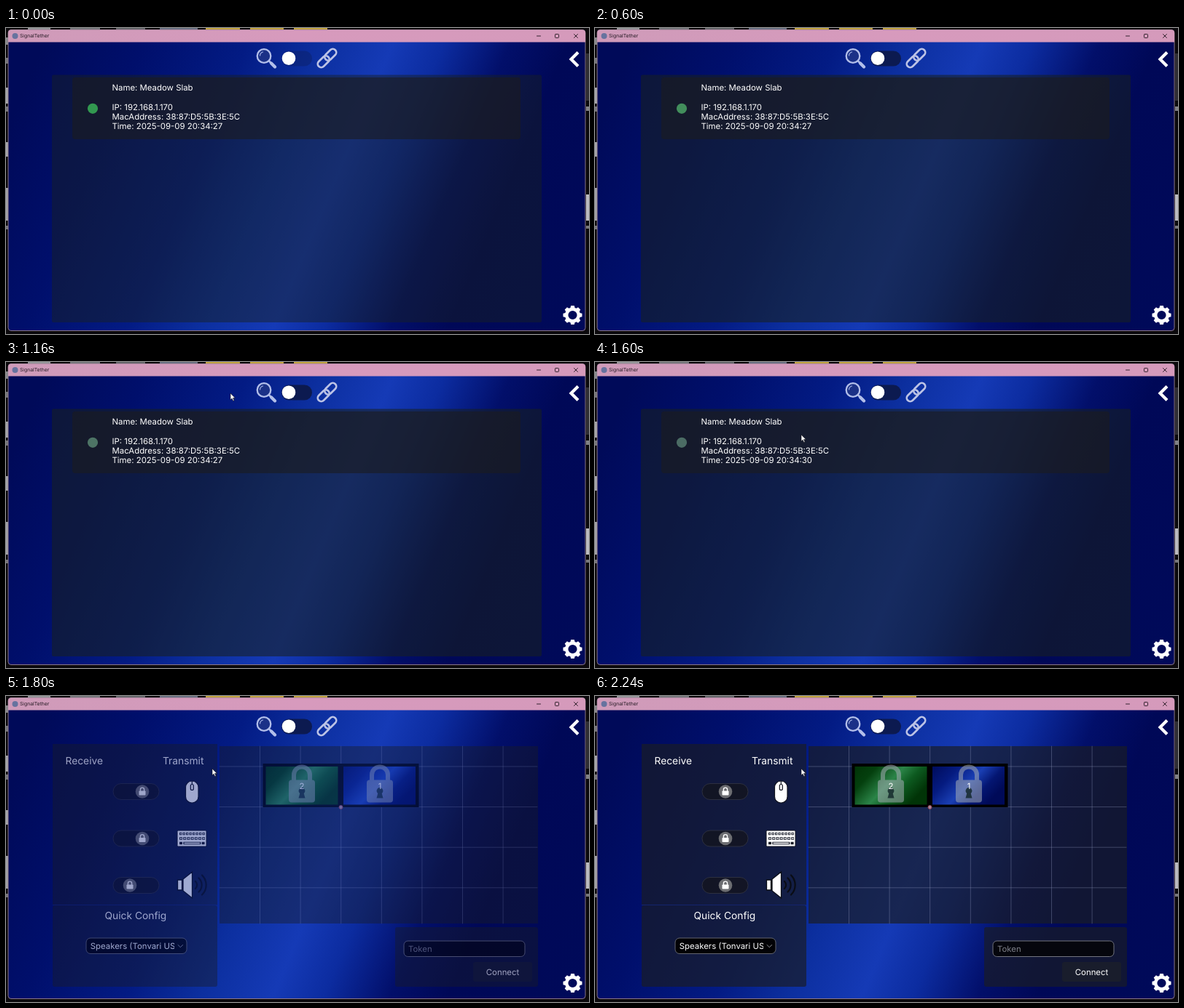
Recreate the animation shown at these times as an HTML page. Size 800 by 421 pixels, loop 2280 ms.

```html
<!DOCTYPE html>
<html lang="en">
<head>
<meta charset="utf-8">
<title>SignalTether</title>
<style>
  html, body { margin: 0; width: 100%; height: 100%; overflow: hidden; background: #0b090c; }
  svg { display: block; width: 100vw; height: 100vh; }
  text { font-family: Inter, "Open Sans", sans-serif; fill: #fff; text-rendering: geometricPrecision; white-space: pre; }
  .body { font-size: 11.4px; }
  .head { font-size: 13.8px; }
  .line { fill: none; stroke-linecap: round; stroke-linejoin: round; }
</style>
</head>
<body>
<svg viewBox="0 0 800 421" preserveAspectRatio="none">
  <defs>
    <linearGradient id="beam" gradientUnits="userSpaceOnUse" x1="0" y1="0" x2="850" y2="357">
      <stop offset=".06" stop-color="#000a59"/>
      <stop offset=".2" stop-color="#000f6c"/>
      <stop offset=".34" stop-color="#031b84"/>
      <stop offset=".44" stop-color="#0c2f9f"/>
      <stop offset=".54" stop-color="#153ab6"/>
      <stop offset=".61" stop-color="#0c2ca0"/>
      <stop offset=".7" stop-color="#020f6a"/>
      <stop offset=".78" stop-color="#000857"/>
      <stop offset="1" stop-color="#000a5a"/>
    </linearGradient>
    <linearGradient id="bar" x1="0" x2="1" y1="0" y2="0">
      <stop offset="0" stop-color="#cf9bb9"/>
      <stop offset=".5" stop-color="#d79abd"/>
      <stop offset="1" stop-color="#d59abb"/>
    </linearGradient>
    <linearGradient id="green" x1="0" x2="1" y1="0" y2=".5">
      <stop offset="0" stop-color="#013307"/>
      <stop offset=".25" stop-color="#04400e"/>
      <stop offset=".55" stop-color="#2b8448"/>
      <stop offset=".75" stop-color="#0d5a20"/>
      <stop offset="1" stop-color="#013407"/>
    </linearGradient>
    <linearGradient id="blue" x1="0" x2="1" y1="0" y2=".5">
      <stop offset="0" stop-color="#000c5c"/>
      <stop offset=".3" stop-color="#051b80"/>
      <stop offset=".58" stop-color="#1a3fb4"/>
      <stop offset=".8" stop-color="#041672"/>
      <stop offset="1" stop-color="#000a58"/>
    </linearGradient>
    <clipPath id="comboClip"><rect x="112" y="334" width="119" height="20"/></clipPath>
    <g id="padlock">
      <path class="line" d="M-11 -7V-16a11 11 0 0 1 22 0V-7" stroke="#a4acb4" stroke-width="6" stroke-linecap="butt"/>
      <rect x="-18" y="-9" width="36" height="31" rx="4" fill="#a4acb4"/>
    </g>
    <g id="keyhole">
      <circle cy="6" r="4.4" fill="#102528"/>
      <path d="M-2 7h4l2.5 9h-9z" fill="#102528"/>
    </g>
    <g id="knob">
      <circle r="9.3" fill="#6c6d71"/>
      <path class="line" d="M-2.6 -1v-1.8a2.6 2.6 0 0 1 5.2 0V-1" stroke="#fff" stroke-width="1.4"/>
      <rect x="-4.5" y="-1" width="9" height="6" rx=".8" fill="#fff"/>
    </g>
  </defs>

  <!-- desktop edges behind the window -->
  <g id="desktop"></g>

  <!-- window -->
  <rect x="3" y="2.5" width="792" height="414" rx="4" fill="url(#beam)" stroke="#8b7686" stroke-width="1"/>
  <path d="M3 19.5V6.500q0-4 4-4H791q4 0 4 4V19.500z" fill="url(#bar)"/>
  <circle cx="12.500" cy="11" r="4" fill="#66739f"/>
  <text x="19" y="13.400" style="font-size:6.800px;fill:#251a24">SignalTether</text>
  <g class="line" stroke="#33232e" stroke-width="1">
    <path d="M728.500 11h5M779.500 8.500l5 5m0-5l-5 5"/>
    <rect x="753.500" y="8.500" width="5" height="5" rx=".8"/>
  </g>

  <!-- toolbar -->
  <g class="line">
    <circle cx="354" cy="38.500" r="9.300" fill="#1b3187" stroke="#b3bfea" stroke-width="2.300"/>
    <path d="M348.500 38a5.600 5.600 0 0 1 4-5" stroke="#9faee3" stroke-width="1.200"/>
    <path d="M361 45.500l2 2" stroke="#b3bfea" stroke-width="2.500"/>
    <path d="M364 48.500l5 5" stroke="#b3bfea" stroke-width="4.400"/>
  </g>
  <rect id="track" x="378" y="31.500" width="42" height="21" rx="10.500" fill="#0c1a50"/>
  <circle cx="388" cy="41.700" r="9.300" fill="#fff"/>
  <g class="line" transform="translate(440.500 41.500) rotate(-45)" stroke="#bcc3e6" stroke-width="2.700">
    <rect x="-16" y="-4.800" width="18.500" height="9.600" rx="4.800"/>
    <rect x="-2.500" y="-4.800" width="18.500" height="9.600" rx="4.800"/>
  </g>
  <path class="line" d="M785 33.500L775.500 43L785 52.500" stroke="#fff" stroke-width="4.200" style="stroke-linecap:butt;stroke-linejoin:miter"/>
  <g id="gear" transform="translate(777.500 395)" fill="#fff">
    <circle r="8.300" fill="none" stroke="#fff" stroke-width="4.400"/>
  </g>

  <!-- device list -->
  <g id="listView">
    <rect id="listPanel" x="63" y="64.500" width="672" height="340.500" rx="2" fill="#182020" fill-opacity=".57"/>
    <rect x="91" y="68" width="615" height="85" rx="4" fill="#1c1c1e" fill-opacity=".6"/>
    <circle id="status" cx="119" cy="110.800" r="7.100"/>
    <g class="body">
      <text x="145.500" y="85.800">Name: Meadow Slab</text>
      <text x="145.500" y="112.600">IP: 192.168.1.170</text>
      <text x="145.500" y="126">MacAddress: 38:87:D5:5B:3E:5C</text>
      <text x="145.500" y="139.400" id="stamp"></text>
    </g>
  </g>

  <!-- connection page -->
  <g id="linkView">
    <g fill="#1a1d24" fill-opacity=".68">
      <rect x="64" y="66" width="226" height="221"/>
      <rect x="64" y="288" width="226" height="112" rx="3"/>
      <rect x="293" y="69" width="437" height="244"/>
      <rect x="534" y="318" width="196" height="82" rx="3"/>
    </g>
    <path d="M64 287.500H290" stroke="#14246e" stroke-width="1"/>
    <path id="grid" class="line" stroke="#929bc0" stroke-opacity=".36" stroke-width="1"/>

    <g class="head">
      <text x="81.500" y="94">Receive</text>
      <text x="215" y="94">Transmit</text>
      <text x="135.500" y="307">Quick Config</text>
    </g>
    <g id="switches"></g>

    <!-- mouse -->
    <g stroke="#10131d" stroke-width="1.200">
      <rect x="246.500" y="117" width="17.500" height="30" rx="8.500" fill="#fff"/>
      <path d="M255.300 117v5"/>
      <rect x="253.300" y="121.500" width="4" height="8" rx="2" fill="#fff"/>
    </g>
    <!-- keyboard -->
    <rect x="235" y="185" width="40" height="22" rx="1.500" fill="#fff" stroke="#10131d"/>
    <g class="line" stroke="#161a26" stroke-width="3.400" style="stroke-linecap:butt">
      <path d="M238 189.500H273" stroke-dasharray="3.300 1.200"/>
      <path d="M238 196H273" stroke-dasharray="4 1.200"/>
      <path d="M238 202.500h4m1.300 0h24m1.300 0h4"/>
    </g>
    <g class="line" stroke="#fff" stroke-width="1.600" style="stroke-linecap:butt">
      <path d="M239 189.500H273" stroke-dasharray="1.600 2.900"/>
      <path d="M239 196H273" stroke-dasharray="2.200 3"/>
      <path d="M244.500 202.500h21.500"/>
    </g>
    <!-- speaker -->
    <path d="M235.500 253h6v14h-6zM243 252l12.500-10v36l-12.500-10z" fill="#fff" stroke="#0b0e16" stroke-width="1.300"/>
    <g class="line" stroke="#0a0d15" stroke-width="2.200">
      <path d="M260 255a7 7 0 0 1 0 10M264.500 250.500a13 13 0 0 1 0 19M269 246.500a19 19 0 0 1 0 27"/>
    </g>

    <rect x="110" y="333" width="138" height="21.500" rx="6" fill="#020206" stroke="#63656f"/>
    <text class="body" x="115.800" y="347.500" clip-path="url(#comboClip)">Speakers (Tonvari USB)</text>
    <path class="line" d="M236 342.500l3.300 3.200l3.300-3.200" stroke="#8b8d96" stroke-width="1"/>

    <rect x="546" y="337" width="166" height="21.500" rx="5.500" fill="#05060d" stroke="#73757f"/>
    <text class="body" x="552" y="351.500" style="fill:#7d7f88">Token</text>
    <rect x="641" y="366" width="81" height="27" rx="3" fill="#191d2c"/>
    <text class="body" x="681.500" y="383.500" text-anchor="middle">Connect</text>

    <!-- screens -->
    <path d="M352.500 93H566.500V153H352.500z" fill="#000"/>
    <rect x="356.500" y="97" width="99" height="52.500" fill="url(#green)"/>
    <rect x="463" y="97" width="99" height="52.500" fill="url(#blue)"/>
    <g id="locks" class="body" text-anchor="middle"></g>
    <circle cx="459.500" cy="153" r="2.500" fill="#a18d9d" stroke="#953d53"/>
  </g>

  <path id="cursor" d="M0 0V9L2.100 7.200L3.700 10.600L5.100 9.900L3.600 6.600H6.400z" fill="#fff" stroke="#101018" stroke-width=".6"/>
</svg>

<script>
const LOOP = 2280, STEP = 40;
const $ = id => document.getElementById(id);
const add = (parent, tag, attrs, label = '') => {
  const el = document.createElementNS('http://www.w3.org/2000/svg', tag);
  for (const key in attrs) el.setAttribute(key, attrs[key]);
  el.textContent = label;
  return parent.appendChild(el);
};

// Piecewise linear track: rows of [time, ...values].
function track(rows, t) {
  if (t <= rows[0][0]) return rows[0].slice(1);
  for (let i = 1; i < rows.length; i++) {
    const [a, b] = [rows[i - 1], rows[i]];
    if (t <= b[0]) {
      const k = (t - a[0]) / (b[0] - a[0]);
      return a.slice(1).map((v, j) => v + (b[j + 1] - v) * k);
    }
  }
  return rows[rows.length - 1].slice(1);
}

// x, y, width, height, colour
const scraps = [
  [30, 0, 31, 3, '#97979b'], [88, 0, 41, 3, '#77777c'], [151, 0, 40, 3, '#66666b'], [211, 0, 52, 3, '#6b7184'],
  [274, 0, 47, 3, '#c3a441'], [335, 0, 46, 3, '#c3a441'], [395, 0, 46, 3, '#c3a441'],
  [0, 13, 3, 10, '#8b8b8f'], [0, 41, 3, 8, '#76767a'], [0, 82, 3, 22, '#a8a8ac'], [0, 108, 3, 7, '#77777b'],
  [0, 157, 3, 20, '#a8a8ac'], [0, 220, 3, 45, '#a3a3a8'], [0, 272, 3, 5, '#77777b'],
  [796, 35, 4, 65, '#302e34'], [796, 108, 4, 6, '#818186'], [796, 229, 4, 36, '#bbbbc0'], [796, 272, 4, 4, '#77777b']
];
for (const [x, y, width, height, fill] of scraps) add($('desktop'), 'rect', { x, y, width, height, fill });

for (let i = 0; i < 8; i++)
  add($('gear'), 'path', { d: 'M-3.300 -9L-2.300 -13H2.300L3.300 -9z', transform: `rotate(${i * 45})` });

let d = '';
for (let i = 0; i < 7; i++) d += `M${348.5 + i * 55.6} 69V313`;
for (let i = 0; i < 4; i++) d += `M293 ${97 + i * 55.6}H729`;
$('grid').setAttribute('d', d);

const switches = [[131.500, 195], [196, 195], [260.500, 161]].map(([y, from]) => {
  add($('switches'), 'rect', {
    x: 147, y: y - 11, width: 63, height: 22, rx: 11,
    fill: '#13151e', 'fill-opacity': .8, stroke: '#343744', 'stroke-width': .8
  });
  return { y, from, knob: add($('switches'), 'use', { href: '#knob' }) };
});

for (const [x, label] of [[406, '2'], [513, '1']]) {
  const transform = `translate(${x} 124.500)`;
  add($('locks'), 'use', { href: '#padlock', transform, opacity: .55 });
  add($('locks'), 'use', { href: '#keyhole', transform, opacity: .8 });
  add($('locks'), 'text', { x, y: 128 }, label);
}

const motion = {
  list: [[1640, 1], [1740, 0]],
  link: [[1700, 0], [1800, .62], [1880, 1]],
  panel: [[0, .47], [160, .57]],
  track: [[0, .35], [160, 1]],
  knob: [[1720, 0], [1880, 1]],
  dot: [[0, 50, 152, 80], [360, 56, 150, 84], [600, 66, 142, 92], [1160, 77, 116, 101], [1600, 75, 108, 100]],
  cursor: [[1000, 335, 4], [1160, 308, 43], [1280, 297, 68], [1400, 287, 91], [1480, 283, 100]]
};

function draw(t) {
  const at = name => track(motion[name], t);
  $('listView').setAttribute('opacity', at('list')[0]);
  $('linkView').setAttribute('opacity', at('link')[0]);
  $('listPanel').setAttribute('fill-opacity', at('panel')[0]);
  $('track').setAttribute('opacity', at('track')[0]);
  $('status').setAttribute('fill', `rgb(${at('dot').map(Math.round)})`);
  $('stamp').textContent = 'Time: 2025-09-09 20:34:' + (t < 1400 ? 27 : 30);
  const k = at('knob')[0];
  for (const { y, from, knob } of switches)
    knob.setAttribute('transform', `translate(${from + (179 - from) * k} ${y})`);
  const [x, y] = at('cursor');
  $('cursor').setAttribute('transform', `translate(${x} ${y})`);
  $('cursor').setAttribute('visibility', t < 1000 ? 'hidden' : 'visible');
}

const start = performance.now();
function tick() {
  const t = (performance.now() - start) % LOOP;
  draw(Math.floor(t / STEP) * STEP);
  requestAnimationFrame(tick);
}
tick();
</script>
</body>
</html>
```
